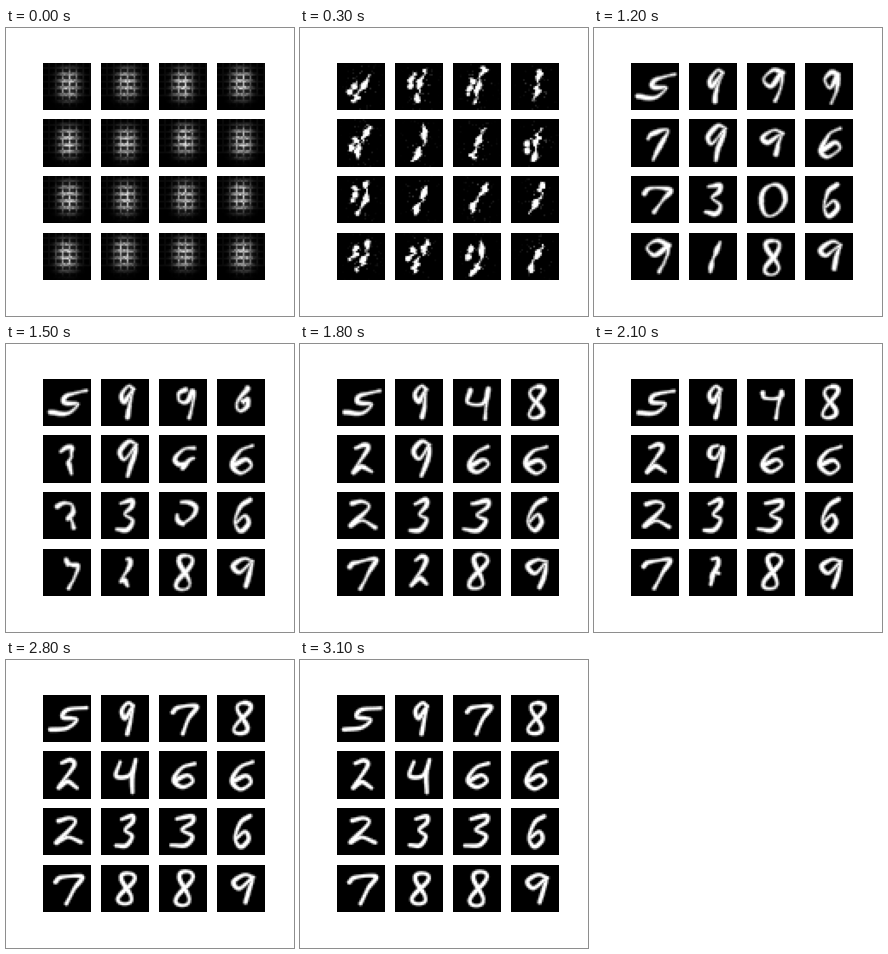
A matplotlib script that plays this animation: 288 by 288 pixels, repeating every 3200 ms.

```python
import numpy as np
import matplotlib.pyplot as plt
from matplotlib.animation import FuncAnimation

SIZE, FRAMES, STEP = 28, 32, 100
TIMES = [3, 8, 12, 18, 25, 31]        # frames where a cell shows a settled pose
LEARN = (3, 8, 12, 31)                # key times for the slow trends below
CENTRE, SLANT = np.array([14.8, 14.3]), 0.12
GY, GX = np.mgrid[0:SIZE, 0:SIZE] + 0.5
TURN = np.linspace(0, 2 * np.pi, 40)

# Key points of each digit in a box from -1 to 1, y down
GLYPHS = {
    "0": np.c_[np.sin(TURN), -np.cos(TURN)],
    "1": [(0.3, -1), (0.1, 0), (-0.3, 1)],
    "2": [(-0.8, -0.8), (0, -1), (0.4, -0.6), (-0.8, 0.8), (0, 0.4), (1, 0.8)],
    "3": [(-0.7, -0.8), (0.5, -1), (0.6, -0.6), (-0.2, -0.1), (0.7, 0.3), (0.2, 0.9), (-1, 0.9)],
    "4": [(-0.8, -0.8), (-1, 0), (0.3, 0), (0.7, -0.9), (0.6, 0), (0.8, 1)],
    "5": [(1, -0.9), (-0.1, -0.7), (-0.3, -0.1), (0.5, 0.1), (0, 0.8), (-1, 0.9)],
    "6": [(0.7, -1), (-0.3, -0.6), (-0.8, 0.4), (0, 1), (0.8, 0.5), (0.3, 0), (-0.6, 0.4)],
    "7": [(-1, -0.4), (-0.6, -0.7), (0.9, -0.8), (0.4, 0), (0, 1)],
    "8": np.c_[0.8 * np.sin(2 * TURN), -np.cos(TURN)],
    "9": [(0.8, -0.8), (0, -1), (-0.8, -0.5), (-0.2, 0), (0.7, -0.7), (0.6, 0.2), (0.4, 1)],
}

# Digit at each pose, half width, half height
CELLS = [
    ("155555", 10, 7), ("179999", 4, 9), ("169477", 7, 9), ("189888", 5, 9),
    ("157222", 6, 9), ("159944", 6, 10), ("199666", 7, 7), ("126666", 7, 8),
    ("157222", 8, 8), ("123333", 5, 9), ("180333", 7, 9), ("126666", 5, 9),
    ("159777", 8, 9), ("131288", 5, 9), ("128888", 5, 10), ("169999", 7, 8),
]


def smooth(points, n=70):
    """Catmull-Rom curve through the points, evenly resampled to n."""
    p = np.array(points, float)
    q = np.vstack([2 * p[0] - p[1], p, 2 * p[-1] - p[-2]])
    t = np.linspace(0, 1, 10)[:, None]
    path = np.vstack([
        0.5 * (2 * b + (c - a) * t + (2 * a - 5 * b + 4 * c - d) * t**2
               + (3 * b - a - 3 * c + d) * t**3)
        for a, b, c, d in zip(q, q[1:], q[2:], q[3:])])
    s = np.r_[0, np.cumsum(np.hypot(*np.diff(path, axis=0).T))]
    u = np.linspace(0, s[-1], n)
    return np.c_[np.interp(u, s, path[:, 0]), np.interp(u, s, path[:, 1])]


def trend(f, *values):
    return np.interp(f, LEARN, values)


def pose(k, i):
    """Digit of cell k at pose i, bent less and less as training goes on."""
    digits, w, h = CELLS[k]
    w = max(w, 6) if i == 0 else w
    pts = smooth(GLYPHS[digits[i]]) * (w, h)
    pts[:, 0] -= SLANT * pts[:, 1]
    rng = np.random.default_rng(50 * k + i)
    phase = rng.uniform(0, 2 * np.pi, 2)
    bend = np.sin(pts[:, 1::-1] / 4 + phase)
    return CENTRE + pts + trend(TIMES[i], 1.2, 1.3, 0.8, 0.2) * bend


POSES = [[pose(k, i) for i in range(len(TIMES))] for k in range(len(CELLS))]


def ink(pts, radius, edge, gx):
    d = np.hypot(gx[..., None] - pts[:, 0], GY[..., None] - pts[:, 1])
    return np.clip((radius - d).max(axis=2) / edge + 0.5, 0, 1)


def lattice(k):
    """Untrained output: a brick grid that glows in the middle."""
    rng = np.random.default_rng(100 + k)
    cx, cy = (14.5, 13) + rng.uniform(-0.8, 0.8, 2)
    glow = np.exp(-np.abs((GX - cx) / 6) ** 2.5 - np.abs((GY - cy) / 9) ** 3)
    ix, iy = GX.astype(int), GY.astype(int)
    hole = (iy % 4 < 2) & (ix % 4 != 3)
    grid = np.where(hole, 0.2, 0.75) * rng.uniform(0.6, 1.15, GX.shape)
    faint = 0.04 * ((ix % 4 == 3) | (iy % 4 == 3)) * (GY < 20)
    return np.clip(glow * grid + faint, 0, 1)


def digit(k, f):
    i = min(np.searchsorted(TIMES, f, "right") - 1, len(TIMES) - 2)
    u = (f - TIMES[i]) / (TIMES[i + 1] - TIMES[i])
    u = u * u * (3 - 2 * u)
    pts = POSES[k][i] * (1 - u) + POSES[k][i + 1] * u

    # strokes swell and thin unevenly while the shapes are still young
    rng = np.random.default_rng(k)
    swell = np.sin(np.linspace(0, 11, len(pts)) + rng.uniform(0, 6))
    radius = trend(f, 1.1, 1.5, 1.15, 1.2) + trend(f, 0.7, 0.7, 0.4, 0.15) * swell
    edge = trend(f, 0.9, 1.5, 1.4, 1.1)
    lean = trend(f, 1, 0.4, 0.1, 0)
    gx = GX + lean * rng.uniform(-1, 1, (SIZE // 2, 1)).repeat(2, axis=0)
    img = ink(pts, radius, edge, gx)

    # early on many cells have a shorter second streak on the left
    second = trend(f, 1, 0, 0, 0)
    if second > 0 and rng.random() < 0.65:
        side = CENTRE + (-5, rng.uniform(-4, 1)) + 0.4 * (POSES[k][0] - CENTRE)
        img = np.maximum(img, second * ink(side, radius, edge, gx))
    near = np.exp(-((GX - 15) / 7) ** 2 - ((GY - 14) / 11) ** 2)
    specks = (rng.random(GX.shape) > 0.93) * rng.random(GX.shape) * near
    return np.maximum(img, 0.5 * second * specks)


def picture(k, f):
    u = min(f / TIMES[0], 1)
    img = u * digit(k, max(f, TIMES[0]))
    return img + (1 - u) * lattice(k) if u < 1 else img


fig, axes = plt.subplots(4, 4, figsize=(4, 4), dpi=72, facecolor="white")
fig.subplots_adjust(left=0.125, right=0.9, bottom=0.125, top=0.88, wspace=0.2, hspace=0.2)
images = []
for k, ax in enumerate(axes.flat):
    ax.axis("off")
    images.append(ax.imshow(picture(k, 0), cmap="gray", vmin=0, vmax=1))


def update(f):
    for k, im in enumerate(images):
        im.set_data(picture(k, f))
    return images


anim = FuncAnimation(fig, update, frames=FRAMES, interval=STEP, repeat=True, repeat_delay=0)
plt.show()
```
